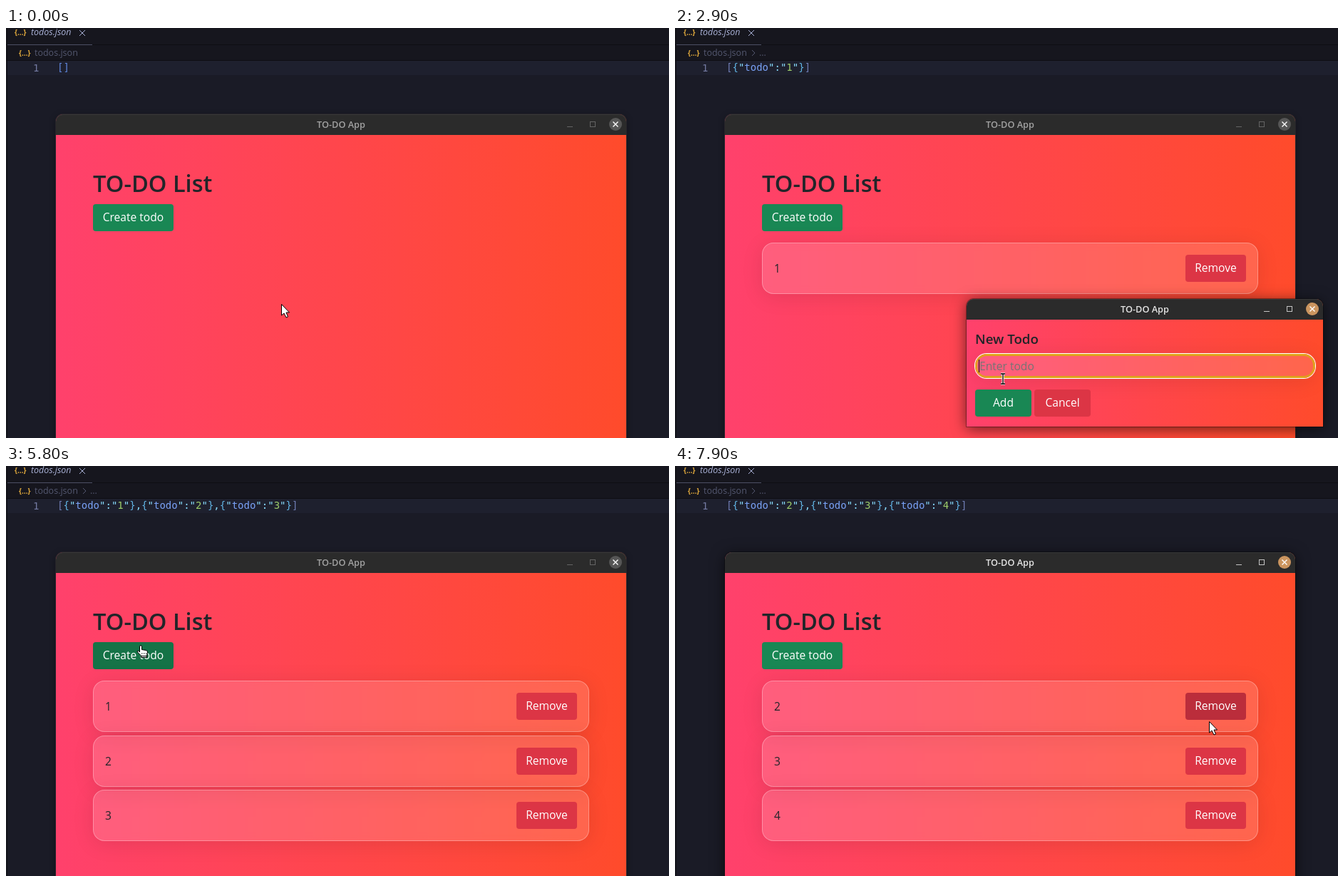
Write an HTML page that moves like this. It is 930 px wide and 575 px high and loops after 8 s.

```html
<!DOCTYPE html>
<html lang="en">
<head>
<meta charset="utf-8">
<title>TO-DO App</title>
<style>
html, body { margin: 0; width: 100%; height: 100%; overflow: hidden; background: #1a1b26; }
body { position: relative; font: 15.6px "Open Sans", "Noto Sans", sans-serif; color: #212529; }
div, svg { position: absolute; box-sizing: border-box; white-space: pre; }

.bar { left: 0; width: 100%; background: #16161e; border-bottom: 1px solid #0e0e13; }
.name { font-size: 12.5px; line-height: 20px; color: #545870; }
.icon { font: bold 10px/20px "Open Sans", sans-serif; color: #e0a93c; }
.code { font: 14px/20px "DejaVu Sans Mono", monospace; }
.edge { color: #6f7db5; } .empty { color: #5f86dc; }
.brace { color: #61b4e4; } .mark { color: #89ddff; } .key { color: #7aa2f7; } .str { color: #9ece6a; }

.win { border-radius: 10px 10px 0 0; background: linear-gradient(90deg, #ff416c, #ff4b2b);
  box-shadow: 0 0 0 1px #25232a, 0 2px 10px #0006; }
.win.on { box-shadow: 0 0 0 1px #0005, 0 3px 20px #0009; }
.title { left: 0; top: 0; width: 100%; height: 29px; border-radius: 10px 10px 0 0; background: #2b2b2b;
  box-shadow: inset 0 1px #383838; font-size: 12.7px; font-weight: 600; line-height: 28px;
  text-align: center; color: #a2a2a2; }
.on .title { color: #e4e4e4; }
.min, .max { color: #646464; }
.on .min, .on .max { color: #c4c4c4; }
.min { right: 75px; top: 17px; width: 8px; height: 1px; background: currentColor; }
.max { right: 43px; top: 10px; width: 8px; height: 8px; border: 1px solid; }
.close { right: 6px; top: 5px; background: #565656; border-radius: 50%; }
.on .close { background: #cb955f; }

.btn { height: 38px; border-radius: 4px; line-height: 37px; text-align: center; color: #fff; }
.green { background: #198754; } .green.hot { background: #157347; }
.red { background: #dc3545; } .red.hot { background: #bb2d3b; }
.glass { background: #ffffff26; border: 1px solid #ffffff4d; border-radius: 16px;
  box-shadow: 0 4px 30px #0000001a; backdrop-filter: blur(5px); }
.card { left: 52px; width: 696px; height: 72px; padding-left: 16px; line-height: 70px; }
.card .btn { left: 593px; top: 16px; width: 85px; }
h1, h2 { position: absolute; margin: 0; font-weight: 600; white-space: pre; }
h1 { left: 52px; top: 77px; font-size: 32.6px; line-height: 40px; }
h2 { left: 12px; top: 45px; font-size: 18.7px; line-height: 22px; }
#field { left: 12px; top: 77px; width: 477px; height: 34px; padding-left: 5px; line-height: 33px; }
.on #field { box-shadow: 0 0 0 1px #fff, inset 0 0 0 2px #dda01c, 0 4px 30px #0000001a; border-color: #e8ad20; }
.hint { color: #757575; }
#caret { width: 1px; height: 18px; top: 85px; background: #111; }
#pointer { left: 0; top: 0; }
</style>
</head>
<body>
<div class="bar" style="top:0;height:24px"></div>
<div style="left:2px;top:23px;width:119px;height:1px;background:#4c4f63"></div>
<div class="icon" style="left:12px;top:-4px">{…}</div>
<div class="name" style="left:35px;top:-4px;font-style:italic;color:#a9b1d6">todos.json</div>
<svg style="left:102px;top:2px" width="10" height="10" stroke="#a9b1d6"><path d="M1 1L9 9M9 1L1 9"/></svg>
<div class="bar" style="top:24px;height:22px"></div>
<div class="icon" style="left:18px;top:25px">{…}</div>
<div class="name" style="left:40px;top:25px">todos.json</div>
<div id="crumb" class="name" style="left:118px;top:25px">…
  <svg style="left:-11px;top:5px" width="7" height="10" fill="none" stroke="#545870"><path d="M1 1L5 5L1 9"/></svg></div>
<div style="left:2px;top:46px;width:928px;height:20px;background:#1e202e"></div>
<div class="code" style="left:38px;top:46px;color:#737aa2">1</div>
<div id="json" class="code" style="left:72px;top:45px"></div>
<div style="left:1px;top:0;width:1px;height:575px;background:#101014"></div>

<div id="main" class="win" style="left:70px;top:121px;width:800px;height:520px">
  <h1>TO-DO List</h1>
  <div id="create" class="btn green" style="left:52px;top:126px;width:113px">Create todo</div>
  <div id="list" style="left:0;top:0;width:100%"></div>
</div>
<div id="popup" class="win on" style="left:409px;top:380px;width:500px;height:179px">
  <h2>New Todo</h2>
  <div id="field" class="glass"></div>
  <div id="caret"></div>
  <div id="add" class="btn green" style="left:12px;top:127px;width:79px">Add</div>
  <div class="btn red" style="left:95px;top:127px;width:79px">Cancel</div>
</div>

<svg id="pointer" width="930" height="575" stroke-linejoin="round">
  <g id="arrow" fill="#fff" stroke="#000"><path d="M.5 .5V16L4 13L7 19L9.5 18L7 12H11.5Z"/></g>
  <g id="hand" fill="#fff" stroke="#000">
    <path d="M-1.5 9V1.2a1.5 1.5 0 0 1 3 0V5.5l6 1q2.5 .6 2 3.5l-1 4v2.5h-8v-2.5l-5-5q-1-2 1-2z"/>
    <path d="M1 11h1.5M4 11h1.5M7 11h1.5M1 14.5h7"/></g>
  <g id="beam" fill="none"><path stroke="#fff" stroke-width="3" d="M-3-7H3M-3 7H3M0-7V7"/>
    <path stroke="#000" stroke-width="1.3" d="M-3-7H3M-3 7H3M0-7V7"/></g>
</svg>

<script>
const LOOP = 8000, STEP = 100;
const $ = id => document.getElementById(id);

// One entry per todo: popup opens, text typed, popup closes, file saved
const adds = [
  { open: 750, type: 1500, close: 1755, save: 1900 },
  { open: 2150, type: 3100, close: 3255, save: 3400 },
  { open: 4050, type: 4500, close: 4755, save: 5000 },
  { open: 5850, type: 6600, close: 6955, save: 7200 }
];
const removed = { list: 7800, file: 7900 };

// Pointer path: time, x, y
const path = [
  [0, 386, 387], [500, 190, 268], [700, 190, 268], [1100, 500, 470], [1300, 525, 471],
  [1500, 500, 480], [1700, 466, 524], [1800, 466, 524], [2100, 195, 270], [2200, 195, 270],
  [2400, 462, 480], [2800, 462, 480], [2900, 460, 492], [3000, 460, 522], [3300, 460, 524],
  [3700, 197, 268], [3800, 196, 271], [4000, 196, 271], [4400, 480, 472], [4600, 470, 522],
  [5000, 470, 522], [5600, 192, 262], [5800, 189, 252], [6000, 191, 256], [6400, 480, 474],
  [6500, 476, 478], [6800, 471, 522], [7100, 471, 522], [7500, 755, 338], [7800, 755, 340],
  [7900, 749, 358]
];

for (const id of ["main", "popup"]) $(id).insertAdjacentHTML("afterbegin",
  `<div class="title">TO-DO App<div class="min"></div><div class="max"></div>
<svg class="close" width="18" height="18" stroke="#fff" stroke-width="1.4"><path d="M5.5 5.5L12.5 12.5M12.5 5.5L5.5 12.5"/></svg></div>`);

function pointerAt(t) {
  const i = path.findIndex(p => p[0] > t);
  if (i < 0) return path[path.length - 1].slice(1);
  if (i === 0) return path[0].slice(1);
  const [a, b] = [path[i - 1], path[i]];
  const k = (t - a[0]) / (b[0] - a[0]), e = k * k * (3 - 2 * k);
  return [a[1] + (b[1] - a[1]) * e, a[2] + (b[2] - a[2]) * e];
}

const inside = ([x, y], l, t, w, h) => x >= l && x <= l + w && y >= t && y <= t + h;

function target(t) {
  const p = pointerAt(t);
  if (adds.some(a => t >= a.open && t < a.close + 50)) {
    if (inside(p, 421, 507, 79, 38)) return "add";
    if (inside(p, 421, 457, 477, 36)) return "field";
    if (inside(p, 409, 380, 500, 179)) return "";
  }
  if (inside(p, 122, 247, 113, 38)) return "create";
  return t > 7100 && inside(p, 716, 318, 85, 38) ? "remove" : "";
}

function items(t, stage, cut) {
  const all = adds.map((a, i) => t >= a[stage] ? i + 1 : 0).filter(Boolean);
  return t >= cut ? all.slice(1) : all;
}

const span = (cls, text) => `<span class="${cls}">${text}</span>`;
function jsonHtml(list) {
  if (!list.length) return span("empty", "[]");
  const q = span("mark", '"');
  const rows = list.map(n => span("brace", "{") + q + span("key", "todo") + q + span("mark", ":") +
    q + span("str", n) + q + span("brace", "}"));
  return span("edge", "[") + rows.join(span("mark", ",")) + span("edge", "]");
}

function drawPopup(t) {
  const a = adds.find(a => t >= a.open && t < a.close + 150), box = $("popup");
  box.style.display = a ? "" : "none";
  if (!a) return;
  const closing = t >= a.close, typed = t >= a.type;
  if (closing) {
    const k = 1 - (t - a.close) / 150;
    box.style.opacity = k ** 1.7;
    box.style.transformOrigin = "50% 50%";
    box.style.transform = `scale(${0.8 + 0.2 * k})`;
  } else {
    const p = (t - a.open) / 250, k = p < 1 ? 1 - 2 ** (-10 * p) : 1;
    box.style.opacity = k;
    box.style.transformOrigin = "50% 100%";
    box.style.transform = k < 1 ? `scale(${k})` : "none";
  }
  box.classList.toggle("on", !closing);
  $("field").textContent = typed ? adds.indexOf(a) + 1 : "Enter todo";
  $("field").classList.toggle("hint", !typed);
  $("caret").style.left = (typed ? 27 : 17) + "px";
  $("caret").style.display = closing ? "none" : "";
}

function draw(t) {
  const saved = items(t, "save", removed.file);
  $("json").innerHTML = jsonHtml(saved);
  $("crumb").style.display = saved.length ? "" : "none";

  const hot = target(t - STEP), over = target(t);
  $("list").innerHTML = items(t, "close", removed.list).map((n, i) =>
    `<div class="card glass" style="top:${Math.floor(180.5 + i * 76.5)}px">${n}` +
    `<div class="btn red${hot === "remove" && !i ? " hot" : ""}">Remove</div></div>`).join("");
  $("create").classList.toggle("hot", hot === "create");
  $("add").classList.toggle("hot", hot === "add");

  const busy = adds.some(a => t >= a.open - 50 && t < a.close + 100);
  $("main").classList.toggle("on", t >= 500 && !busy);
  drawPopup(t);

  const shape = over === "field" ? "beam" : over ? "hand" : "arrow";
  const [x, y] = pointerAt(t).map(Math.round);
  for (const id of ["arrow", "hand", "beam"]) {
    $(id).style.display = id === shape ? "" : "none";
    $(id).setAttribute("transform", `translate(${x} ${y})`);
  }
}

let start, shown = -1;
function tick(now) {
  start ??= now;
  const t = Math.floor((now - start) % LOOP / STEP) * STEP;
  if (t !== shown) draw(shown = t);
  requestAnimationFrame(tick);
}
draw(0);
requestAnimationFrame(tick);
</script>
</body>
</html>
```
